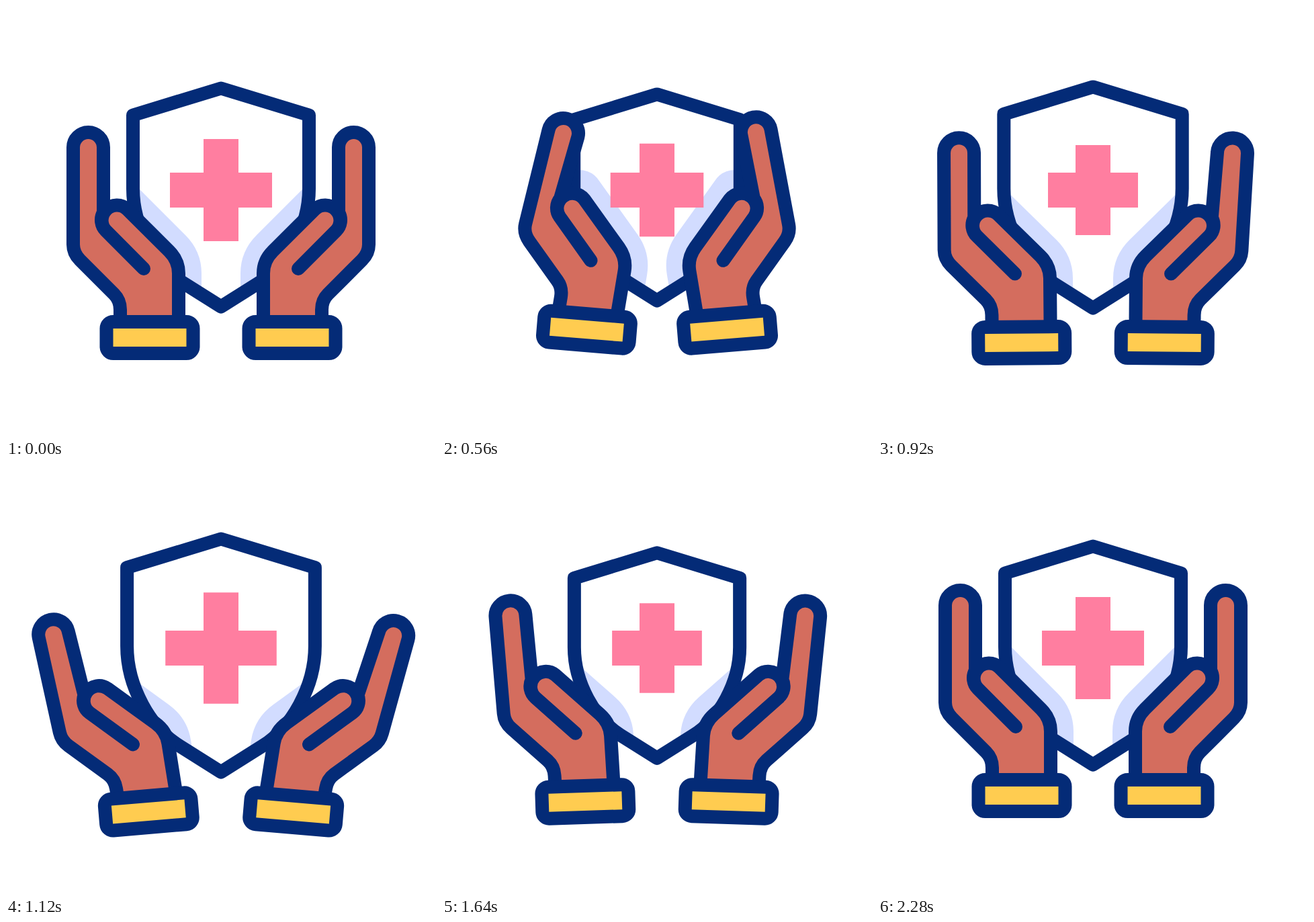
An HTML page that plays this animation: 640x640 px, repeating every 2.64 s.

```html
<!DOCTYPE html>
<html lang="en">
<head>
<meta charset="utf-8">
<title>Protecting hands</title>
<style>
  html, body { margin: 0; height: 100%; overflow: hidden; background: #fff; }
  svg { display: block; width: 100vw; height: 100vh; }
  .line { stroke: #042b77; stroke-width: 20; stroke-linecap: round; stroke-linejoin: round; }
  .fixed { vector-effect: non-scaling-stroke; }
  .cross { stroke: #ff7ea0; stroke-width: 52; }
  .shade { stroke: #d2dcff; stroke-width: 68; stroke-linecap: round; stroke-linejoin: round; }
  .skin { fill: #d46d5e; }
  .cuff { fill: #ffcc50; }
</style>
</head>
<body>
<svg viewBox="0 0 640 640" fill="none">
  <defs>
    <path id="shield" class="fixed" d="M320 122.5 451 162.5V272C451 329 418 386 378 411L320 447.5 262 411C222 386 189 329 189 272V162.5Z"/>
    <clipPath id="inside"><use href="#shield"/></clipPath>
  </defs>
  <g clip-path="url(#inside)">
    <path class="shade"/>
    <path class="shade" transform="matrix(-1 0 0 1 640 0)"/>
  </g>
  <path id="cross" class="cross fixed" d="M244 274H396M320 198V350"/>
  <use href="#shield" class="line"/>
  <g class="hand">
    <path class="line skin"/>
    <rect class="line cuff" x="149.5" y="470" width="129" height="47" rx="10"/>
  </g>
  <g class="hand" transform="matrix(-1 0 0 1 640 0)">
    <path class="line skin"/>
    <rect class="line cuff" x="149.5" y="470" width="129" height="47" rx="10"/>
  </g>
</svg>
<script>
const LOOP = 2640;
const CUFF = [214, 493.5], WRIST = [214, 470], KNUCKLE = [122, 355];
const HAND_TIMES = [200, 620, 1210, 1920];
const SHIELD_TIMES = [200, 640, 1160, 1640, 2120];
const CROSS_TIMES = [320, 800, 1280, 1760, 2260];

const $ = id => document.getElementById(id);
const hands = [...document.querySelectorAll('.hand')];
const shades = [...document.querySelectorAll('.shade')];

// Smooth interpolation through values at the given times
function track(t, times, values) {
  if (t <= times[0]) return values[0];
  for (let i = 1; i < times.length; i++) {
    if (t < times[i]) {
      const u = (t - times[i - 1]) / (times[i] - times[i - 1]);
      return values[i - 1] + (values[i] - values[i - 1]) * u * u * (3 - 2 * u);
    }
  }
  return values.at(-1);
}

// Rotates around `from` and carries that point to `to`
function mover(from, to, degrees) {
  const a = degrees * Math.PI / 180, c = Math.cos(a), s = Math.sin(a);
  return (x, y) => {
    const dx = x - from[0], dy = y - from[1];
    return [to[0] + dx * c - dy * s, to[1] + dx * s + dy * c];
  };
}

const scaleAbout = (x, y, s) => `translate(${x} ${y}) scale(${s}) translate(${-x} ${-y})`;

function drawHand(i, t) {
  const swing = (inward, outward) => track(t, HAND_TIMES, [0, inward, outward, 0]);
  const cuffTurn = swing(5, -5.5);
  const dx = swing(1.5, -1.9), dy = swing(-12.5, 26.3);
  const cuff = mover(CUFF, [CUFF[0] + dx, CUFF[1] + dy], cuffTurn);
  const palm = mover(WRIST, cuff(...WRIST), swing(10, -10.3));
  const fingerTurn = i ? swing(11.2, -17.2) : swing(14.6, -14.2);
  const finger = mover(KNUCKLE, palm(...KNUCKLE), fingerTurn);

  const bend = 'A22.5 22.5 0 0';
  const side = `L${palm(243, 365)}
    C${palm(252, 374)} ${palm(257, 385)} ${palm(257, 398)} L${palm(257, 470)}`;
  const outline = `M${palm(170, 470)} L${palm(170, 452)}
    C${palm(170, 442)} ${palm(167, 435)} ${palm(161, 429)} L${palm(110, 378)}
    C${finger(103.5, 371.5)} ${finger(100, 363)} ${finger(100, 355)}
    L${finger(100, 210.5)} ${bend} 1 ${finger(145, 210.5)}
    L${palm(145, 307.2)} ${bend} 0 ${palm(148.6, 334.4)}
    L${palm(205, 391)} L${palm(148.6, 334.4)} ${bend} 1 ${palm(180.4, 302.6)} ${side}`;

  const [path, rect] = hands[i].children;
  path.setAttribute('d', outline);
  rect.setAttribute('transform', `translate(${dx} ${dy}) rotate(${cuffTurn} ${CUFF})`);
  shades[i].setAttribute('d', `M${palm(172, 294.2)} ${side}`);
}

function draw(now) {
  const t = now % LOOP;
  const shieldScale = track(t, SHIELD_TIMES, [1, 0.94, 1.07, 0.94, 1]);
  const crossScale = track(t, CROSS_TIMES, [1, 0.825, 1.18, 0.825, 1]);
  $('shield').setAttribute('transform', scaleAbout(320, 285, shieldScale));
  $('cross').setAttribute('transform', scaleAbout(320, 274, crossScale));
  drawHand(0, t);
  drawHand(1, t);
}

const start = performance.now();
function tick() {
  draw(performance.now() - start);
  requestAnimationFrame(tick);
}
tick();
</script>
</body>
</html>
```
